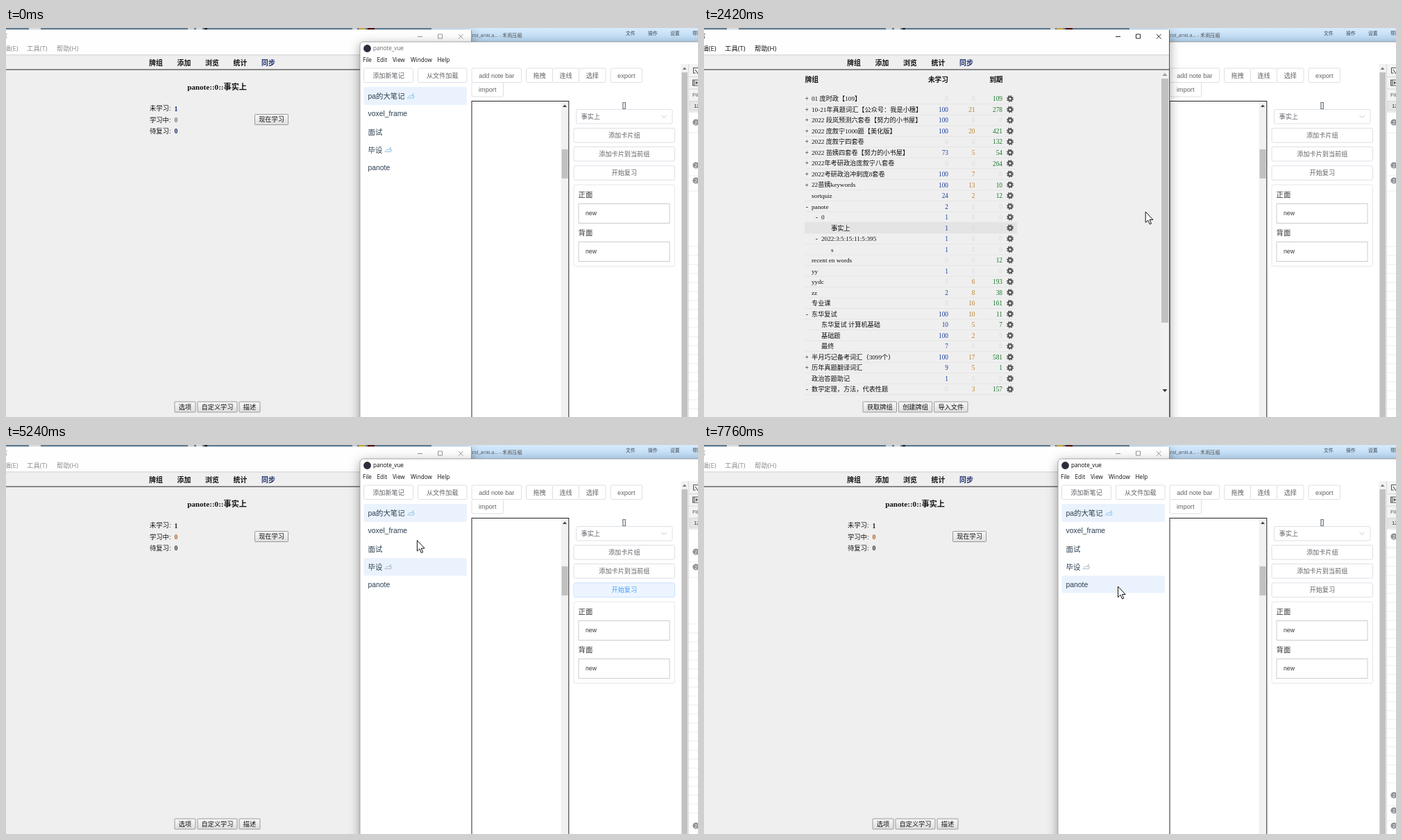
These frames come from a looping animation (997 px wide and 561 px high, 8000 ms). An HTML page:

```html
<!DOCTYPE html>
<html lang="zh-CN">
<head>
<meta charset="utf-8">
<title>Deck review</title>
<style>
html, body { margin: 0; width: 100%; height: 100%; overflow: hidden; background: #fff; }
svg { display: block; width: 100%; height: 100%; }
text { font-family: "Liberation Sans", "Noto Sans CJK SC", sans-serif; }
.serif { font-family: "Liberation Serif", "Noto Sans CJK SC", serif; }
.menu { font-family: "Open Sans", "Noto Sans CJK SC", sans-serif; }
.bold { font-weight: bold; }
.window { filter: drop-shadow(0 4px 8px rgba(0, 0, 0, .38)); }
</style>
</head>
<body>
<svg id="stage" viewBox="0 0 997 561" preserveAspectRatio="none">
  <defs>
    <linearGradient id="sky" x2="0" y2="1"><stop stop-color="#d6eafc"/><stop offset="1" stop-color="#b9d9f4"/></linearGradient>
    <linearGradient id="key" x2="0" y2="1"><stop stop-color="#f8f8f8"/><stop offset="1" stop-color="#dedede"/></linearGradient>
  </defs>
</svg>
<script>
const stage = document.getElementById("stage");
const LOOP = 8000;

function add(parent, tag, attrs = {}, content) {
  const node = document.createElementNS("http://www.w3.org/2000/svg", tag);
  for (const name in attrs) node.setAttribute(name, attrs[name]);
  if (content !== undefined) node.textContent = content;
  parent.appendChild(node);
  return node;
}
const group = parent => add(parent, "g");
const box = (parent, x, y, x2, y2, fill, extra) =>
  add(parent, "rect", { x, y, width: x2 - x, height: y2 - y, fill, ...extra });
const path = (parent, d, stroke, extra) => add(parent, "path", { d, stroke, fill: "none", ...extra });
// y is the vertical centre of the glyphs
const label = (parent, str, x, y, size, fill, cls = "", anchor = "start") =>
  add(parent, "text", { x, y: y + size * .36, "font-size": size, fill, class: cls, "text-anchor": anchor }, str);
const show = (node, on) => node.setAttribute("display", on ? "inline" : "none");

// Desktop and the window behind
const desk = group(stage);
box(desk, 0, 0, 997, 561, "#fff");
box(desk, 0, 0, 640, 4, "#6888a2");
for (const [x, x2, fill] of [[33, 50, "#f2f2f2"], [262, 271, "#dfe8ee"], [274, 283, "#e8eef2"],
  [286, 290, "#222"], [499, 506, "#dfe8ee"], [508, 518, "#d8b44a"], [521, 531, "#5a1515"]]) box(desk, x, 0, x2, 3, fill);
box(desk, 613, 0, 997, 20, "url(#sky)");
label(desk, "control_anki.a... - 禾雨压缩", 743.5, 10.5, 7.1, "#555", "menu", "end");
["文件", "操作", "设置", "帮助"].forEach((s, i) => label(desk, s, 893 + i * 32, 8, 6.8, "#3c4650"));

// Flashcard window
const cards = group(stage);
box(cards, -20, 2.5, 670.5, 600, "#efefef", { class: "window" });
box(cards, 0, 2.5, 670, 38.5, "#fefefe");
box(cards, 0, 38.5, 670, 39.3, "#c9c9c9");
box(cards, 0, 59.5, 670, 60.5, "#222");
const chrome = group(cards);
label(chrome, "言", 2.5, 11.5, 8, "currentColor", "menu", "end");
label(chrome, "编辑(E)", 17.5, 30, 9.4, "currentColor", "menu", "end");
label(chrome, "工具(T)", 30, 30, 9.4, "currentColor", "menu");
label(chrome, "帮助(H)", 73, 30, 9.4, "currentColor", "menu");
path(chrome, "M593 12.5h7 M622.5 9h6v6h-6z M652 9l6.5 6.5m0 -6.5l-6.5 6.5", "currentColor", { "stroke-width": .9 });
["牌组", "添加", "浏览", "统计", "同步"].forEach((s, i) =>
  label(cards, s, 206 + i * 40.5, 50, 9.9, i == 4 ? "#1c2c6c" : "#111", "bold"));
const underline = path(cards, "M206 55.5h20", "#111");
const edge = path(cards, "M670.5 3V561", "#777");

function key(parent, str, x, x2, y) {
  box(parent, x + .5, y, x2 - .5, y + 15, "url(#key)", { stroke: "#9a9a9a", rx: .8 });
  label(parent, str, (x + x2) / 2, y + 7.6, 9.2, "#111", "", "middle");
}

const overview = group(cards);
label(overview, "panote::0::事实上", 304, 85, 11.1, "#111", "serif bold", "middle");
const counts = ["未学习:", "学习中:", "待复习:"].map((s, i) => {
  label(overview, s, 207, 116 + i * 16.2, 9.3, "#111");
  return label(overview, i ? "0" : "1", 245, 116 + i * 16.2, 9.8, "#000", "serif bold", "middle");
});
key(overview, "现在学习", 358, 407, 124.5);
key(overview, "选项", 242.5, 273.5, 539);
key(overview, "自定义学习", 275.5, 333.5, 539);
key(overview, "描述", 335.5, 366.5, 539);

// sign, name, new, learning, due, depth
const DECKS = [
  ["+", "01 庞时政【109】", 0, 0, 109],
  ["+", "10-21年真题词汇【公众号：我是小穗】", 100, 21, 278],
  ["+", "2022 段岚预测六套卷【努力的小书屋】", 100, 0, 0],
  ["+", "2022 庞叙宁1000题【美化版】", 100, 20, 421],
  ["+", "2022 庞叙宁四套卷", 0, 0, 132],
  ["+", "2022 苗姨四套卷【努力的小书屋】", 73, 5, 54],
  ["+", "2022年考研政治庞叙宁八套卷", 0, 0, 264],
  ["+", "2022考研政治冲刺庞8套卷", 100, 7, 0],
  ["+", "22苗姨keywords", 100, 13, 10],
  ["", "sortquiz", 24, 2, 12],
  ["-", "panote", 2, 0, 0],
  ["-", "0", 1, 0, 0, 1],
  ["", "事实上", 1, 0, 0, 2],
  ["-", "2022:3:5:15:11:5:395", 1, 0, 0, 1],
  ["", "s", 1, 0, 0, 2],
  ["", "recent en words", 0, 0, 12],
  ["", "yy", 1, 0, 0],
  ["", "yydc", 0, 6, 193],
  ["", "zz", 2, 8, 38],
  ["", "专业课", 0, 16, 161],
  ["-", "东华复试", 100, 10, 11],
  ["", "东华复试 计算机基础", 10, 5, 7, 1],
  ["", "基础题", 100, 2, 0, 1],
  ["", "最终", 7, 0, 0, 1],
  ["+", "半月巧记备考词汇（3099个）", 100, 17, 581],
  ["+", "历年真题翻译词汇", 9, 5, 1],
  ["", "政治答题助记", 1, 0, 0],
  ["-", "数学定理，方法，代表性题", 0, 3, 157]
];
const deckList = group(cards);
label(deckList, "牌组", 145.5, 75, 9.7, "#111", "bold");
label(deckList, "未学习", 352, 75, 9.7, "#111", "bold", "end");
label(deckList, "到期", 430.5, 75, 9.7, "#111", "bold", "end");
DECKS.forEach(([sign, name, fresh, learn, due, depth = 0], i) => {
  const y = 102 + i * 15.52, x = 155 + depth * 14;
  if (i == 12) box(deckList, 145, y - 7.7, 451, y + 7.7, "#e4e4e4");
  path(deckList, `M145 ${y + 7.7}H451`, "#e3e3e3", { "stroke-width": .8 });
  label(deckList, sign, x - 6.8, y, 9.3, "#111", "serif", "middle");
  label(deckList, name, x, y, 9.2, "#111", "serif");
  [[fresh, 352, "#1f3f9f"], [learn, 390.5, "#b9812f"], [due, 430, "#1c7a2c"]].forEach(([n, end, fill]) =>
    label(deckList, n, end, y, 9.4, n ? fill : "#dadada", "serif", "end"));
  add(deckList, "circle", { cx: 441, cy: y, r: 2.7, fill: "none", stroke: "#555", "stroke-width": 2.2 });
  add(deckList, "circle", { cx: 441, cy: y, r: 4.2, fill: "none", stroke: "#555", "stroke-width": 1.5, "stroke-dasharray": 1.65 });
});
box(deckList, 658, 61, 669.5, 530, "#f1f1f1");
box(deckList, 659, 73, 669, 425, "#c1c1c1");
path(deckList, "M660.5 69h7l-3.5 -4z", "none", { fill: "#999" });
path(deckList, "M660.5 521h7l-3.5 4z", "none", { fill: "#333" });
key(deckList, "获取牌组", 228.5, 278, 539);
key(deckList, "创建牌组", 280, 329, 539);
key(deckList, "导入文件", 331, 380.5, 539);

// Note window
const notes = group(stage);
box(notes, 510, 20, 1040, 620, "#fff", { rx: 5, class: "window" });
box(notes, 510, 20, 1040, 620, "none", { rx: 5, stroke: "#8a8a8a", "stroke-width": .7 });
add(notes, "circle", { cx: 520.5, cy: 29.5, r: 5.4, fill: "#2b2e3a" });
const title = label(notes, "panote_vue", 529, 29.5, 8.1, "#000", "menu");
[["File", 514], ["Edit", 534.5], ["View", 557], ["Window", 583], ["Help", 621.5]].forEach(([s, x]) =>
  label(notes, s, x, 46, 8.2, "#111", "menu"));

function button(str, x, x2, y, y2 = y + 20.5) {
  const frame = box(notes, x, y, x2, y2, "#fff", { stroke: "#dcdfe6", rx: 2 });
  return [frame, label(notes, str, (x + x2) / 2, (y + y2) / 2, 9.15, "#606266", "", "middle")];
}
button("添加新笔记", 515.5, 586.5, 58);
button("从文件加载", 593.5, 664, 58);
button("add note bar", 671, 742.5, 58);
button("拖拽", 749.5, 787.5, 58);
button("连线", 787.5, 825.5, 58);
button("选择", 825.5, 864, 58);
button("export", 871, 916.5, 58);
button("import", 671, 716.5, 78.5);

const ROW_EDGES = [85, 111, 137, 163, 188.5, 213.5];
const rows = ROW_EDGES.slice(0, 5).map((y, i) => box(notes, 515.5, y, 664, ROW_EDGES[i + 1], "#eaf3fd", { rx: 1.5 }));
[["pa的大笔记", 98.5], ["voxel_frame", 123.5], ["面试", 150], ["毕设", 176], ["panote", 201]].forEach(([s, y]) =>
  label(notes, s, 521.5, y, 10.4, "#2c3e50"));
const thumb = (x, y) =>
  path(notes, `M${x} ${y + 3}h9.5 M${x + 1} ${y + 2}l2.5 -2.5 2 1 3.5 -4 -1.5 3.5 2.5 0 -1 3`, "#86bfe8", { "stroke-width": .9 });
thumb(578, 98);
const lowerThumb = thumb(545.5, 175.5);

box(notes, 671, 105.5, 810.8, 600, "#fff", { stroke: "#222" });
box(notes, 799.5, 106, 810, 600, "#f1f1f1");
box(notes, 800.5, 175, 809.5, 217, "#c1c1c1");
path(notes, "M802 114h6l-3 -3.6z", "none", { fill: "#444" });

label(notes, "[]", 890.5, 111, 10.3, "#2c3e50", "", "middle");
box(notes, 821.5, 117.5, 960, 138, "#fff", { stroke: "#dcdfe6", rx: 2 });
label(notes, "事实上", 828.5, 127.7, 9.15, "#606266");
path(notes, "M944.5 126l3.5 3.5 3.5 -3.5", "#c0c4cc");
button("添加卡片组", 818, 963.5, 144.5);
button("添加卡片到当前组", 818, 963.5, 171.5);
const [startFrame, startText] = button("开始复习", 818, 963.5, 198.8);
box(notes, 818, 226, 963.5, 343.5, "#fff", { stroke: "#e4e7ed", rx: 2.5 });
[["正面", 240.5], ["背面", 295.5]].forEach(([s, y]) => {
  label(notes, s, 824.5, y, 10.4, "#303133");
  box(notes, 825, y + 13, 956, y + 41, "#fff", { stroke: "#ccc" });
  label(notes, "new", 835, y + 26.5, 8.7, "#333");
});

box(notes, 972.5, 52, 983, 561, "#f1f1f1");
box(notes, 973.5, 64, 982, 561, "#c1c1c1");
path(notes, "M974.8 60h5.6l-2.8 -3.4z", "none", { fill: "#777" });
box(notes, 983.5, 52, 997, 121, "#f3f3f3");
path(notes, "M983.5 52V561 M984 70.5h13 M984 88h13 M984 121h13", "#d0d0d0", { "stroke-width": .8 });
path(notes, "M997 57.5h-6.5v7.5h3 M993 60l4 6 M997 75h-7.5v8h7.5 M991.5 75v8", "#555", { "stroke-width": 1.1 });
path(notes, "M993.5 76.5l4 2.5 -4 2.5z", "none", { fill: "#555" });
label(notes, "Filter", 989, 96, 7.8, "#555");
box(notes, 985, 105.5, 1000, 118.5, "#e6e6e6", { stroke: "#ccc", "stroke-width": .7 });
label(notes, "12", 991, 112, 7.8, "#333");

function consoleView(badges, from, to) {
  const view = group(notes);
  for (let y = from; y < to; y += 13) path(view, `M984 ${y}h13`, "#ececec");
  for (const y of badges) {
    path(view, `M984 ${y + 15}h13`, "#ececec");
    add(view, "circle", { cx: 994, cy: y, r: 4.6, fill: "#8f8f94" });
    label(view, "2", 994, y, 7, "#fff", "", "middle");
  }
  return view;
}
const consoles = [
  consoleView([136, 198, 220], 315, 561),
  consoleView([154, 176, 549], 258, 540),
  consoleView([132, 505, 527, 549], 149, 495)
];

// Pointer
const pointer = group(stage);
const ink = { fill: "#fff", "stroke-width": 1, "stroke-linejoin": "round" };
const arrow = path(pointer, "M0 0V15.5L3.6 12.3 6 18 8.3 17 5.9 11.5H10.7Z", "#111", ink);
const hand = path(pointer, "M-.5 1.5Q1 -.6 2.5 1.5V8Q4.5 6.8 5.6 8.6 7.6 7.4 8.6 9.3 10.8 8.6 11.4 10.6" +
  "V15.5L9.6 21.5H1.2L-4.4 14Q-5.6 11.6 -3.2 11.4L-.5 13.6Z", "#111", { ...ink, transform: "rotate(-9)" });

const MOVES = [
  [260, 792, 528], [330, 742, 490], [390, 697.5, 458], [480, 697.5, 458],
  [800, 510, 290], [1080, 285, 92], [1280, 226, 50], [1350, 225, 49], [1960, 225, 49],
  [2250, 440, 160], [2520, 740, 320], [2760, 871, 383], [2800, 871, 383],
  [3080, 884, 270], [3300, 884, 210], [3370, 884, 210], [3560, 881.5, 212], [4430, 881.5, 212],
  [4680, 850, 234], [5000, 690, 216], [5170, 612, 172], [5240, 592.5, 138],
  [5290, 597, 115], [5350, 598, 99], [5450, 598, 99],
  [5620, 600, 118], [5800, 600, 94], [5960, 600, 101], [6050, 600, 101],
  [6210, 601, 150], [6370, 603, 208], [6470, 604, 211], [6620, 604, 211],
  [6840, 617, 202], [7060, 609, 196], [7290, 600, 208], [7540, 600, 208],
  [7650, 584, 203], [7755, 596.5, 204], [LOOP, 596.5, 204]
];
const same = (a, b) => a[1] == b[1] && a[2] == b[2];
function slope(i, axis) {
  const a = MOVES[i - 1], b = MOVES[i], c = MOVES[i + 1];
  if (!a || !c || same(a, b) || same(b, c)) return 0;
  return (c[axis] - a[axis]) / (c[0] - a[0]);
}
// Smooth path through the points, at rest wherever a point repeats
function pointerAt(t) {
  const i = Math.max(0, MOVES.findIndex(m => m[0] > t) - 1);
  const a = MOVES[i], b = MOVES[i + 1], span = b[0] - a[0];
  const u = Math.max(0, (t - a[0]) / span), v = 1 - u;
  return [1, 2].map(axis =>
    v * v * (1 + 2 * u) * a[axis] + u * u * (3 - 2 * u) * b[axis] +
    span * u * v * (v * slope(i, axis) - u * slope(i + 1, axis)));
}

const HOVERS = [[0, -1], [5130, 4], [5200, 3], [5290, 2], [5350, -1], [5570, 1], [5720, -1],
  [6140, 1], [6200, 2], [6270, 3], [6340, 4]];
const stepAt = (steps, t) => steps.reduce((value, s) => t >= s[0] ? s[1] : value, -1);

function render(t) {
  const cardsFront = t >= 1500 && t < 3500;
  const listOpen = t >= 1700 && t < 3640;
  const reviewed = t >= 3640;
  const top = cardsFront ? cards : notes;
  if (pointer.previousSibling !== top) stage.insertBefore(top, pointer);

  chrome.setAttribute("color", cardsFront ? "#111" : "#8b8b8b");
  edge.setAttribute("stroke", cardsFront ? "#555" : "#999");
  title.setAttribute("fill", t < 1500 ? "#666" : "#000");
  show(deckList, listOpen);
  show(overview, !listOpen);
  const tints = reviewed ? ["#222", "#b0622f", "#333"] : ["#1b2a70", "#777", "#1b2a70"];
  counts.forEach((n, i) => n.setAttribute("fill", tints[i]));

  const hover = stepAt(HOVERS, t);
  rows.forEach((r, i) => show(r, i == 0 || i == hover));
  lowerThumb.setAttribute("stroke", t >= 5200 ? "#a9b6c0" : "#86bfe8");
  const view = t < 3680 ? 0 : t < 7640 ? 1 : 2;
  consoles.forEach((c, i) => show(c, i == view));

  const [x, y] = pointerAt(t);
  const onLink = x > 205 && x < 228 && y > 42 && y < 57;
  const onStart = x > 818 && x < 963 && y > 198 && y < 220;
  const lit = onStart || (t >= 3400 && t < 7650);
  startFrame.setAttribute("fill", lit ? "#ecf5ff" : "#fff");
  startFrame.setAttribute("stroke", lit ? "#c6e2ff" : "#dcdfe6");
  startText.setAttribute("fill", lit ? "#409eff" : "#606266");
  show(underline, onLink);
  show(pointer, t >= 260);
  show(hand, onLink || onStart);
  show(arrow, !onLink && !onStart);
  pointer.setAttribute("transform", `translate(${x} ${y})`);
}

const begin = performance.now();
function tick() {
  render((performance.now() - begin) % LOOP);
  requestAnimationFrame(tick);
}
tick();
</script>
</body>
</html>
```
